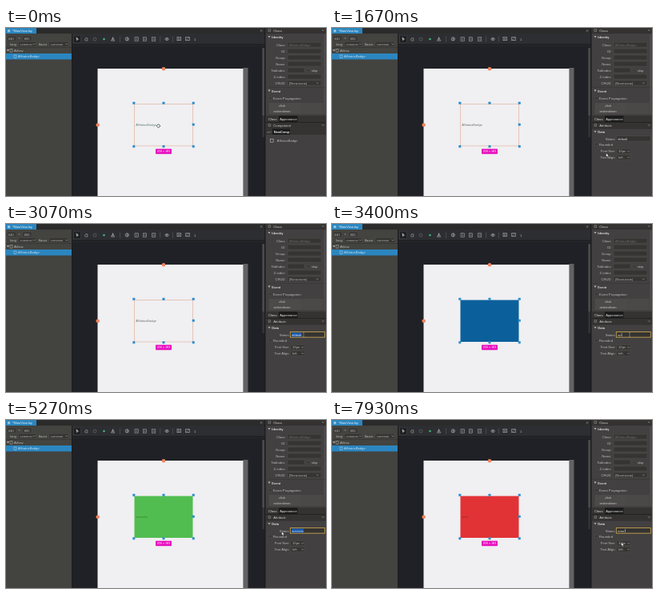
An HTML page that plays this animation: 400 px wide and 211 px high, repeating every 8000 ms.

```html
<!DOCTYPE html>
<html lang="en">
<head>
<meta charset="utf-8">
<title>Badge editor</title>
<style>
html, body { margin: 0; width: 100%; height: 100%; overflow: hidden; background: #202126; }
svg { display: block; width: 100vw; height: 100vh; }
text { font-family: "Liberation Sans", Arial, sans-serif; white-space: pre; }
</style>
</head>
<body>
<svg id="stage" viewBox="0 0 400 211"></svg>
<script>
const LOOP = 8000;
const stage = document.getElementById('stage');

function add(parent, tag, attrs, content) {
  const el = document.createElementNS('http://www.w3.org/2000/svg', tag);
  for (const k in attrs) el.setAttribute(k, attrs[k]);
  if (content !== undefined) el.textContent = content;
  parent.appendChild(el);
  return el;
}
const group = (parent = stage) => add(parent, 'g', {});
const rect = (p, x, y, w, h, fill, extra) => add(p, 'rect', { x, y, width: w, height: h, fill, ...extra });
const path = (p, d, stroke, extra) => add(p, 'path', { d, stroke, fill: 'none', 'stroke-width': 0.7, ...extra });
const label = (p, x, y, s, fill = '#bdbcbb', extra) => add(p, 'text', { x, y, fill, 'font-size': 4.2, ...extra }, s);
const rightLabel = (p, y, s, x = 348.5) => label(p, x, y, s, '#bdbcbb', { 'text-anchor': 'end' });
const box = (p, x, y, w, h = 6, fill = '#353433') =>
  rect(p, x, y, w, h, fill, { stroke: '#504f4e', 'stroke-width': 0.5 });
const arrowDown = (p, x, y) => path(p, `M${x} ${y}l1.3 1.4 1.3-1.4`, '#aaa', { 'stroke-width': 0.6 });
const heading = (p, y, s) => {
  path(p, `M327.5 ${y - 3}h3l-1.5 2.3z`, 'none', { fill: '#bbb' });
  label(p, 332.3, y, s, '#dddcdb', { 'font-weight': 700, 'font-size': 4 });
};
const checkbox = (p, x, y) => box(p, x, y, 3.6, 3.6, '#373635');

function drawLeftPanel() {
  const g = group();
  rect(g, 0, 0, 82.5, 211, '#43433f');
  rect(g, 0, 0, 324, 7, '#2b2b2b');
  rect(g, 0, 0, 38, 7, '#2b86c0');
  label(g, 8, 5, '*MainView.lay', '#f2f7fa', { 'font-size': 4 });
  rect(g, 2, 2, 3.2, 3.2, '#8fc3e2');
  path(g, 'M318 2.2l2.2 2.4m0-2.4l-2.2 2.4', '#aaa', { 'stroke-width': 0.5 });
  box(g, 1.5, 10, 11);
  label(g, 3, 14.5, '640', undefined, { 'font-size': 4 });
  label(g, 15.3, 14.3, '×');
  box(g, 21, 10, 11);
  label(g, 22.7, 14.5, '800', undefined, { 'font-size': 4 });
  label(g, 5, 21.7, 'long');
  box(g, 15.5, 17.2, 22);
  label(g, 17.5, 21.7, 'common', '#b3b2b0', { 'font-size': 4 });
  arrowDown(g, 34, 19.6);
  label(g, 41, 21.7, 'flavor');
  box(g, 54, 17.2, 24);
  label(g, 56, 21.7, 'common', '#b3b2b0', { 'font-size': 4 });
  arrowDown(g, 74.5, 19.6);
  rect(g, 0, 24, 82.5, 0.6, '#30302e');
  path(g, 'M1 27h3l-1.5 2.2z', 'none', { fill: '#bbb' });
  rect(g, 5, 26.5, 3, 3.6, 'none', { stroke: '#b5b4b2', 'stroke-width': 0.5 });
  label(g, 10, 30, 'AView');
  rect(g, 0, 32, 82, 7.5, '#2b86c0');
  rect(g, 10, 34, 3, 3.6, 'none', { stroke: '#b9d9ec', 'stroke-width': 0.5 });
  label(g, 15, 37.4, 'AStatusBadge', '#c5e0ef');
  rect(g, 82, 7, 1, 204, '#1b1b1c');
}

function drawToolbar() {
  const g = group();
  rect(g, 83, 7, 241, 13.5, '#2d2e32');
  rect(g, 83, 20.5, 241, 3, '#232428');
  rect(g, 83, 20, 241, 0.6, '#1b1c1e');
  rect(g, 84.5, 9.2, 9, 9.2, '#1f2022', { stroke: '#47484b', 'stroke-width': 0.5 });
  path(g, 'M87.8 11.6l3 2.6-1.6.2-.7 1.6z', '#bbb', { fill: '#bbb', 'stroke-width': 0.3 });
  path(g, 'M98.5 15.3l1-2.6h2.3v3.3h-2.2z', '#999');
  add(g, 'circle', { cx: 111, cy: 14, r: 2, stroke: '#6d6f72', fill: 'none', 'stroke-width': 0.6 });
  add(g, 'circle', { cx: 122.5, cy: 14, r: 1.3, fill: '#3fb77d' });
  path(g, 'M131.5 16h4.2l-2.1-4zM133.6 11.2v4', '#aaa');
  for (const x of [142, 192.5, 208]) rect(g, x, 10.5, 0.6, 7, '#5b5c5f');
  add(g, 'circle', { cx: 151.3, cy: 13.8, r: 2.1, stroke: '#aeb0b3', fill: 'none', 'stroke-width': 0.7 });
  path(g, 'M151.3 11.7v4.2m0-2.1h2', '#aeb0b3', { 'stroke-width': 0.6 });
  for (const x of [161, 171.3, 182.5]) {
    rect(g, x, 11.7, 4.3, 4.5, 'none', { stroke: '#a4a6a9', 'stroke-width': 0.6 });
    path(g, `M${x + 1} 13.2h2.4m-2.4 1.6h2.4`, '#a4a6a9', { 'stroke-width': 0.5 });
  }
  path(g, 'M198.6 13.9q2.5-3.2 5 0q-2.5 3.2-5 0', '#b7b8ba');
  add(g, 'circle', { cx: 201.1, cy: 13.9, r: 0.8, fill: '#b7b8ba' });
  for (const x of [214, 224.8]) rect(g, x, 11.5, 4.4, 4.2, 'none', { stroke: '#b7b8ba', 'stroke-width': 0.6 });
  path(g, 'M216.2 12.5v2.4m-1.2-1.2h2.4M225.5 15l3-3', '#b7b8ba', { 'stroke-width': 0.5 });
  label(g, 235, 15.5, '1', '#b7b8ba');
}

function drawClassPanel() {
  const g = group();
  rect(g, 320.3, 25, 2.7, 85, '#4b4b4b');
  rect(g, 320.3, 110, 2.7, 27, '#333436');
  rect(g, 324, 0, 76, 211, '#424040');
  rect(g, 323.3, 0, 1.2, 211, '#1b1b1c');
  rect(g, 324.5, 0, 76, 6.5, '#343332');
  label(g, 334.3, 4.5, 'Class', '#d0cfce');
  path(g, 'M328 1.7h2.6v2.6h-2.6z', '#aaa', { 'stroke-width': 0.5 });
  arrowDown(g, 395, 2);
  rect(g, 324.5, 6.5, 76, 0.5, '#2a2928');
  heading(g, 13, 'Identity');
  ['Class', 'ID', 'Group', 'Name', 'TabIndex', 'Z-index', 'CRUD'].forEach((name, i) => {
    const y = 18 + i * 8;
    rightLabel(g, y + 4.5, name);
    box(g, 352, y, i === 4 ? 21 : 42);
  });
  label(g, 354, 22.5, 'AStatusBadge', '#6c6a69');
  checkbox(g, 376, 51.3);
  label(g, 381.8, 54.6, 'skip');
  label(g, 354, 70.5, '(None;none)', undefined, { 'font-size': 4 });
  arrowDown(g, 388, 68.4);
  rect(g, 324.5, 74.5, 76, 0.5, '#343332');
  heading(g, 80.6, 'Event');
  checkbox(g, 328.5, 86.2);
  label(g, 334, 89.6, 'Event Propagation');
  ['click', 'actiondown'].forEach((name, i) => {
    const y = 94.3 + i * 7;
    box(g, 329, y, 39, 6.4, '#4c4b4a');
    box(g, 368.7, y, 27.3, 6.4, '#4a4948');
    label(g, 345, y + 4.6, name, '#c8c7c6', { 'text-anchor': 'middle' });
  });
  rect(g, 397.5, 8, 1.3, 100, '#535251');
  rect(g, 324.5, 110, 76, 8, '#343332');
  rect(g, 341, 110, 23.5, 8, '#1c1c1c');
  label(g, 328, 115.8, 'Class', '#dcdbda');
  label(g, 342.2, 115.8, 'Appearance', '#e6e5e4', { 'font-size': 4 });
  rect(g, 324.5, 118.5, 76, 7.5, '#343332');
  rect(g, 324.5, 118, 76, 0.7, '#1b1b1c');
  rect(g, 324.5, 126, 76, 0.5, '#2a2928');
  path(g, 'M328 120.8h2.6v2.6h-2.6z', '#aaa', { 'stroke-width': 0.5 });
  arrowDown(g, 395, 121.3);
}

function drawComponentPanel() {
  const g = group();
  label(g, 334.3, 123.8, 'Component', '#d0cfce');
  rect(g, 324.5, 126.5, 76, 7.5, '#343332');
  rect(g, 333, 126.5, 22, 7.5, '#1c1c1c');
  label(g, 326, 132, 'util', '#8e8d8c');
  label(g, 334.8, 132, 'NewComp', '#f0f0f0', { 'font-weight': 700, 'font-size': 4 });
  rect(g, 330.5, 139.5, 3.6, 4, 'none', { stroke: '#b9b8b7', 'stroke-width': 0.6 });
  label(g, 338.8, 143, 'AStatusBadge', undefined, { 'font-size': 4 });
  return g;
}

function drawAttributePanel() {
  const g = group();
  label(g, 334.3, 123.8, 'Attribute', '#d0cfce');
  heading(g, 132.3, 'Data');
  rightLabel(g, 140.6, 'Status', 353.5);
  checkbox(g, 328.5, 144.2);
  label(g, 334, 147.6, 'Rounded');
  [['Font Size', '12px'], ['Text Align', 'left']].forEach(([name, value], i) => {
    const y = 151.8 + i * 7.7;
    rightLabel(g, y + 4.5, name, 353.5);
    box(g, 356, y, 17);
    label(g, 358, y + 4.5, value);
    arrowDown(g, 369.3, y + 2.3);
  });
  const field = box(g, 355.3, 135.6, 43, 6.6);
  const selection = rect(g, 357, 136.5, 0, 5, '#1c5cb4');
  const value = label(g, 357.2, 140.5, '', '#e2e1e0', { 'font-size': 4 });
  const caret = rect(g, 357, 136.8, 0.5, 4.4, '#e6e6e6');
  return { g, field, selection, value, caret };
}

function drawCanvas() {
  const g = group();
  rect(g, 296.5, 50, 6, 161, '#626262');
  rect(g, 114.5, 51, 182, 160, '#f0eff2');
  const badge = rect(g, 160.5, 95.5, 73, 52.5, '#f0eff2', { 'stroke-width': 0.7 });
  const text = label(g, 162.3, 122.6, '', '#555', { 'font-size': 4 });
  for (const [x, y] of [[159.8, 94.3], [197, 94.3], [234.3, 94.3], [234.3, 121.3], [159.8, 148.7], [197, 148.7], [234.3, 148.7]])
    rect(g, x - 1.5, y - 1.5, 3, 3, '#2b8fcb', { rx: 0.4 });
  for (const [cx, cy] of [[197, 51.3], [114.7, 121.8]])
    add(g, 'circle', { cx, cy, r: 2.3, fill: '#ef8460' });
  rect(g, 187, 151.7, 20, 6.5, '#e60dbd', { rx: 0.8 });
  label(g, 197, 156.4, '256 x 183', '#fff', { 'text-anchor': 'middle', 'font-size': 3.8 });
  return { badge, text };
}

rect(stage, 0, 0, 400, 211, '#202126');
drawLeftPanel();
drawToolbar();
drawClassPanel();
const canvas = drawCanvas();
const component = drawComponentPanel();
const attribute = drawAttributePanel();
const pointers = {
  arrow: path(stage, 'M0 0v5.1l1.2-1.1.9 2 .9-.4-.9-1.9h1.7z', '#111', { fill: '#fff', 'stroke-width': 0.5 }),
  move: path(stage, 'M0-2.3l2.3 2.3-2.3 2.3-2.3-2.3z', '#222', { fill: '#fff', 'stroke-width': 0.8 }),
  text: path(stage, 'M-1-2.2h2M0-2.2v4.4M-1 2.2h2', '#bdbdbd', { 'stroke-width': 0.4 })
};

// [time, x, y]
const pointerKeys = [
  [0, 190.5, 123], [70, 190.5, 123], [870, 342.5, 157], [1670, 342.5, 157],
  [2070, 372, 139], [4670, 372, 139], [5070, 344.5, 140], [7570, 344.5, 140], [7930, 361.5, 153.5]
];
// [time, value]
const typing = [
  [0, 'default'], [3400, 'su'], [3530, 'suc'], [3600, 'succ'], [3800, 'succe'], [3870, 'succes'],
  [3930, 'success'], [7330, 'err'], [7400, 'error']
];
const fills = [[0, '#f0eff2'], [3400, '#0b609b'], [3930, '#51bd50'], [7330, '#e13336']];

const latest = (keys, t) => keys.filter(k => k[0] <= t).pop()[1];

function pointerAt(t) {
  const i = pointerKeys.findIndex(k => k[0] > t);
  if (i < 0) return pointerKeys[pointerKeys.length - 1].slice(1);
  const [t0, x0, y0] = pointerKeys[i - 1];
  const [t1, x1, y1] = pointerKeys[i];
  const u = (t - t0) / (t1 - t0);
  const e = u * u * (3 - 2 * u);
  return [x0 + (x1 - x0) * e, y0 + (y1 - y0) * e];
}

function pointerKind(t, x, y) {
  if (x < 234) return 'move';
  return t > 1270 && x > 355.5 && y > 135.6 && y < 142.2 ? 'text' : 'arrow';
}

const show = (el, on) => el.setAttribute('visibility', on ? 'visible' : 'hidden');
const set = (el, attrs) => { for (const k in attrs) el.setAttribute(k, attrs[k]); };

function render(t) {
  const [x, y] = pointerAt(t);
  const status = latest(typing, t);
  const colored = t >= 3400;
  const focused = t >= 2470;

  show(component, t < 1270);
  show(attribute.g, t >= 1270);
  set(canvas.badge, { fill: latest(fills, t), stroke: colored ? 'none' : '#e0b5a0' });
  canvas.text.textContent = colored ? status : 'AStatusBadge';
  set(canvas.text, {
    fill: t < 300 ? '#5b7c7a' : colored ? '#222' : '#6c6c70',
    'fill-opacity': !colored ? 1 : t < 3930 ? 0.1 : 0.45
  });

  attribute.value.textContent = status;
  set(attribute.field, {
    stroke: focused ? '#d5ad50' : '#504f4e', 'stroke-width': focused ? 0.8 : 0.5
  });
  const end = 357.2 + (t < 1270 ? 0 : attribute.value.getComputedTextLength());
  const from = t >= 4670 && t < 5270 ? Math.max(357, Math.min(end, x)) : 357;
  const selected = (t >= 2470 && t < 3400) || (t >= 4670 && t < 7330);
  show(attribute.selection, selected);
  set(attribute.selection, { x: from, width: Math.max(0, end + 0.3 - from) });
  show(attribute.caret, focused && !selected);
  set(attribute.caret, { x: end + 0.4 });

  const kind = pointerKind(t, x, y);
  for (const k in pointers) show(pointers[k], k === kind);
  set(pointers[kind], { transform: `translate(${x} ${y})` });
}

const start = performance.now();
function frame() {
  render((performance.now() - start) % LOOP);
  requestAnimationFrame(frame);
}
render(0);
requestAnimationFrame(frame);
</script>
</body>
</html>
```
